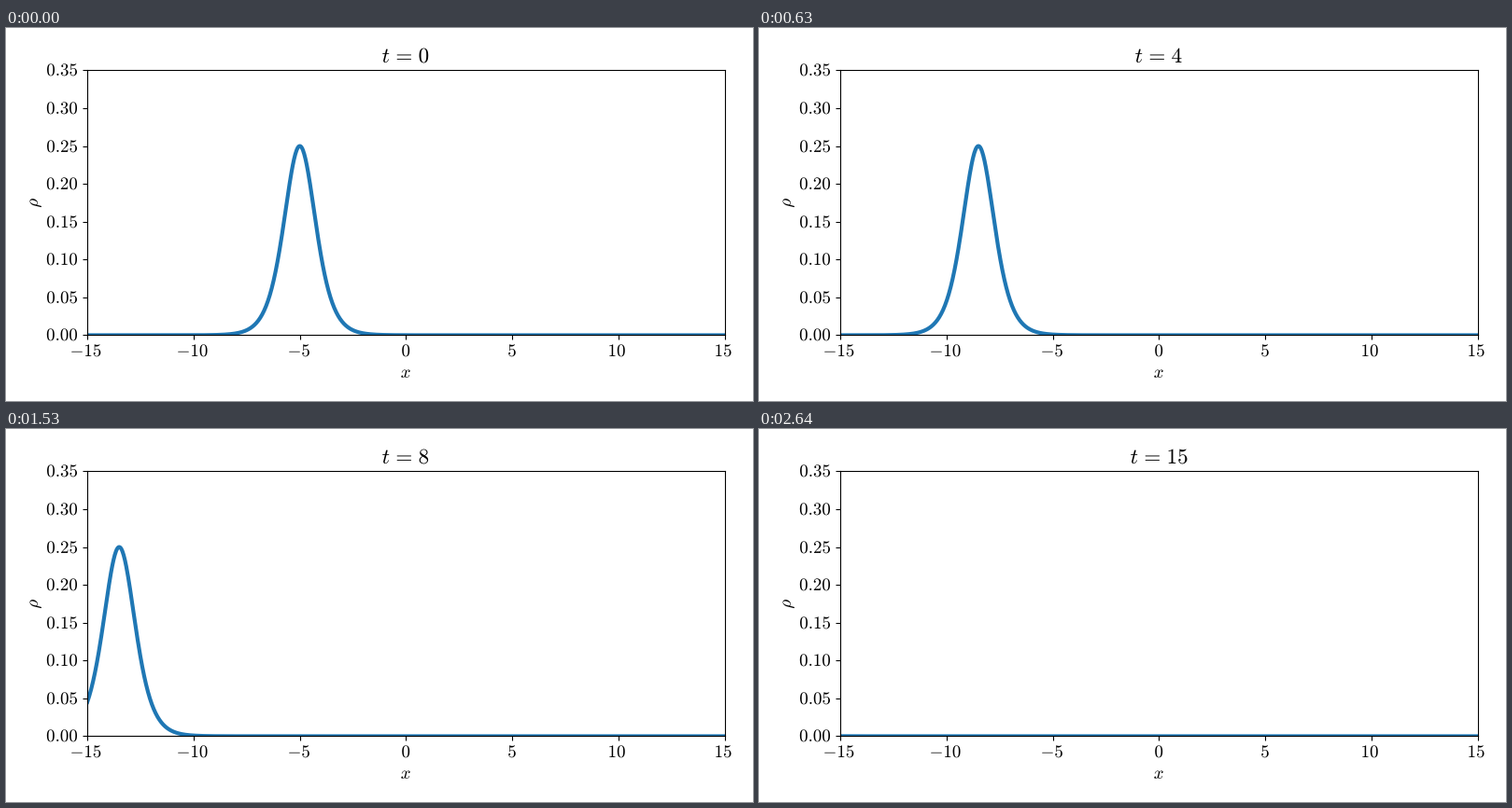
A matplotlib script that plays this animation: 800x400 px, repeating every 2.7 s.

```python
import matplotlib.pyplot as plt
import numpy as np
from matplotlib.animation import FuncAnimation
from matplotlib.patches import PathPatch
from matplotlib.textpath import TextPath
from matplotlib.transforms import Affine2D

plt.rcParams["mathtext.fontset"] = "cm"

DPI = 100
WIDTH, HEIGHT = 800, 400
LEFT, RIGHT, BOTTOM, TOP = 87.1, 769.7, 70.57, 354.57
X_MIN, X_MAX, Y_MAX = -15, 15, 0.35
LABEL_EM, TITLE_EM = 18.95, 23.0
SIDE_BEARING = 0.04

FRAMES, INTERVAL = 90, 30
START, SPEED = -5, -1
TIME_STEP = 1 / 6

fig = plt.figure(figsize=(WIDTH / DPI, HEIGHT / DPI), dpi=DPI, facecolor="white")
ax = fig.add_axes([LEFT / WIDTH, BOTTOM / HEIGHT,
                   (RIGHT - LEFT) / WIDTH, (TOP - BOTTOM) / HEIGHT])
ax.set_xlim(X_MIN, X_MAX)
ax.set_ylim(0, Y_MAX)
ax.tick_params(labelbottom=False, labelleft=False)
pixels = Affine2D().scale(1 / DPI) + fig.dpi_scale_trans


def math_path(tex, em, x, y, align="center", angle=0):
    """Outline of a formula on the baseline y.

    "center" puts the first ink on the whole pixel where the centred advance
    box begins; "ink" centres the ink itself and "right" ends it at x.
    """
    path = TextPath((0, 0), f"${tex}$", size=em)
    box = path.get_extents()
    if align == "center":
        advance = box.x1 + SIDE_BEARING * em
        x = round(x - advance / 2) + 0.2
        anchor = box.x0
    elif align == "right":
        anchor = box.x1
    else:
        anchor = (box.x0 + box.x1) / 2
    place = Affine2D().translate(-anchor, 0).rotate_deg(angle).translate(x, y)
    return place.transform_path(path)


def add_math(*args, **kwargs):
    patch = PathPatch(math_path(*args, **kwargs), facecolor="black",
                      linewidth=0, transform=pixels)
    return fig.add_artist(patch)


def title_args(t):
    # The extra space gives the relation sign its full thick space.
    tex = rf"t\hspace{{0.116}}=\hspace{{0.116}}{t:.0f}"
    return tex, TITLE_EM, (LEFT + RIGHT) / 2, 363


# Tick labels
x_ticks = np.arange(X_MIN, X_MAX + 1, 5)
y_ticks = np.arange(8) * 0.05
ax.set_xticks(x_ticks)
ax.set_yticks(y_ticks)
for value in x_ticks:
    px = LEFT + (value - X_MIN) / (X_MAX - X_MIN) * (RIGHT - LEFT)
    add_math(f"{value}", LABEL_EM, px, 48)
for value in y_ticks:
    py = BOTTOM + value / Y_MAX * (TOP - BOTTOM)
    add_math(f"{value:.2f}", LABEL_EM, 76, round(py) - 6, align="right")

# Axis labels and title
add_math("x", LABEL_EM, 428, 25, align="ink")
add_math(r"\rho", LABEL_EM, 34, 212.4, align="ink", angle=90)
title = add_math(*title_args(0))

xs = np.linspace(X_MIN, X_MAX, 1000)
curve, = ax.plot(xs, np.zeros_like(xs), color="C0", linewidth=3)


def update(i):
    t = i * TIME_STEP
    curve.set_ydata(0.25 / np.cosh(xs - START - SPEED * t) ** 2)
    title.set_path(math_path(*title_args(t)))
    return curve, title


anim = FuncAnimation(fig, update, frames=FRAMES, interval=INTERVAL,
                     repeat=True, repeat_delay=0, blit=False)
plt.show()
```
